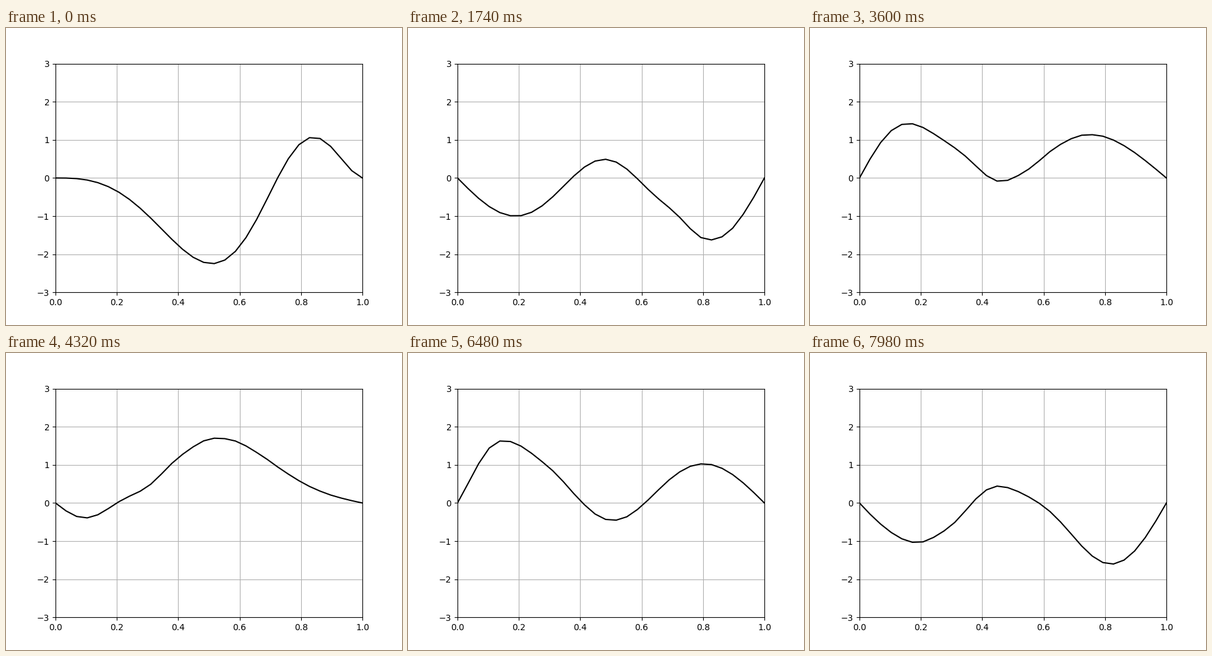
Recreate the animation shown at these times as a matplotlib script. Size 640 by 480 pixels, loop 8000 ms.

```python
import numpy as np
import matplotlib.pyplot as plt
from matplotlib.animation import FuncAnimation

LOOP_MS = 8000
TICK_MS = 20
TICKS_PER_STEP = 3          # the string moves every 60 ms
POINTS = 30
COURANT = 0.0125 * (POINTS - 1)
FIRST_STEP = -0.3           # weight of the curvature in the first step


def curvature(u):
    """Second difference with both ends held fixed."""
    d = np.zeros_like(u)
    d[1:-1] = u[2:] - 2 * u[1:-1] + u[:-2]
    return d


def simulate(x, steps):
    """Leapfrog solution of the wave equation on a string."""
    r2 = COURANT ** 2
    u = -9 * x * (1 - x) * np.sin(6 * x ** 2)
    states = [u, u + FIRST_STEP * r2 * curvature(u)]
    while len(states) < steps:
        prev, cur = states[-2:]
        states.append(2 * cur - prev + r2 * curvature(cur))
    return states


ticks = LOOP_MS // TICK_MS
x = np.linspace(0, 1, POINTS)
states = simulate(x, (ticks - 1) // TICKS_PER_STEP + 1)

fig, ax = plt.subplots(figsize=(6.4, 4.8), dpi=100)
ax.set_xlim(0, 1)
ax.set_ylim(-3, 3)
ax.grid(True)
line, = ax.plot(x, states[0], color="black", lw=1.5)


def update(tick):
    line.set_ydata(states[tick // TICKS_PER_STEP])
    return line,


def reset():
    return update(0)


anim = FuncAnimation(fig, update, frames=ticks, init_func=reset,
                     interval=TICK_MS, repeat=True, repeat_delay=0, blit=True)
plt.show()
```
